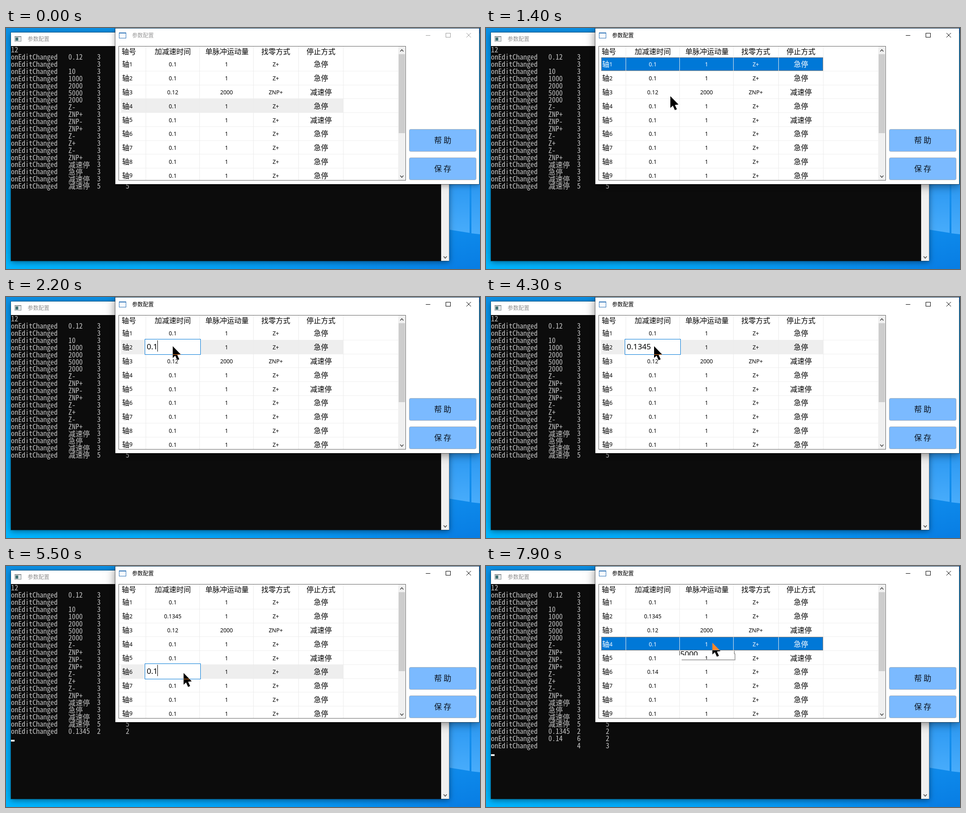
Recreate the animation shown at these times as an HTML page with a canvas. Size 1049 px wide and 534 px high, loop 8000 ms.

```html
<!DOCTYPE html>
<html lang="zh">
<head>
<meta charset="utf-8">
<title>参数配置</title>
<style>
html, body { margin: 0; width: 100%; height: 100%; overflow: hidden; background: #0a93e6; }
canvas { display: block; width: 1049px; height: 534px; }
</style>
</head>
<body>
<canvas id="stage" width="1049" height="534"></canvas>
<script>
const g = document.getElementById('stage').getContext('2d');
const LOOP = 8000, STEP = 100;
const UI = '"Noto Sans", "Open Sans", sans-serif';
const CJK = '"Noto Sans CJK SC", "Noto Sans CJK", "Noto Sans CJK JP", sans-serif';
const MONO = '"Noto Sans Mono CJK SC", "Noto Sans Mono CJK JP", "Liberation Mono", monospace';
const BLUE = '#0078d7';

// Console cell width, and the font size that gives it
const CELL = 7.94;
g.font = `100px ${MONO}`;
const monoSize = CELL * 100 / g.measureText('0').width;

const columns = [309, 428, 547, 647, 746];
const centers = [369, 488, 597, 697];
const headers = ['加减速时间', '单脉冲运动量', '找零方式', '停止方式'];
const ROW = 30.78;

const log = [
  ['12'], ['0.12', 3], ['', 3], ['10', 3], ['1000', 3], ['2000', 3], ['5000', 3], ['2000', 3],
  ['Z-', 3], ['ZNP+', 3], ['ZNP-', 3], ['ZNP+', 3], ['Z-', 3], ['Z+', 3], ['Z-', 3], ['ZNP+', 3],
  ['减速停', 3], ['急停', 3], ['减速停', 3], ['减速停', 5, 5],
  ['0.1345', 2, 2], ['0.14', 6, 2], ['', 4, 3]
];

// time, x, y of the pointer tip
const path = [
  [200, 973, 113], [400, 480, 76], [700, 316, 60], [800, 316, 60], [1000, 336, 78],
  [1400, 408, 151], [1700, 380, 131], [2000, 369, 109], [4200, 369, 109], [4300, 372, 109],
  [5100, 393, 237], [5700, 393, 237], [6000, 391, 251], [6300, 391, 231],
  [6900, 391, 231], [7500, 501, 170]
];

function rect(x, y, w, h, color) {
  g.fillStyle = color;
  g.fillRect(x, y, w, h);
}

function frame(x, y, w, h, color) {
  g.strokeStyle = color;
  g.lineWidth = 1;
  g.strokeRect(x + .5, y + .5, w - 1, h - 1);
}

function line(points, color, width = 1) {
  g.strokeStyle = color;
  g.lineWidth = width;
  g.beginPath();
  points.forEach(([x, y]) => g.lineTo(x, y));
  g.stroke();
}

function shape(points, color) {
  g.fillStyle = color;
  g.beginPath();
  points.forEach(([x, y]) => g.lineTo(x, y));
  g.fill();
}

const isHan = s => /[\u4e00-\u9fff]/.test(s);

// Text centred vertically on cy
function text(s, x, cy, size, color, align = 'left', family = UI) {
  const han = isHan(s);
  g.font = `${size}px ${han ? CJK : family}`;
  g.fillStyle = color;
  g.textAlign = align;
  g.fillText(s, x, cy + size * (han ? .38 : .36));
}

function gradient(x0, y0, x1, y1, ...stops) {
  const fill = g.createLinearGradient(x0, y0, x1, y1);
  stops.forEach((c, i) => fill.addColorStop(i / (stops.length - 1), c));
  return fill;
}

function shadowed(x, y, w, h, color, blur, alpha) {
  g.save();
  g.shadowColor = `rgba(0,0,0,${alpha})`;
  g.shadowBlur = blur;
  g.shadowOffsetY = 3;
  rect(x, y, w, h, color);
  g.restore();
}

function chevron(x, y, dir) {
  line([[x - 3.5, y + 2 * dir], [x, y - 2 * dir], [x + 3.5, y + 2 * dir]], '#505050', 1.8);
}

function desktop() {
  rect(0, 0, 1049, 534, gradient(0, 0, 0, 534, '#0a8fe4', '#04a4f4', '#00b2fc'));
  rect(0, 500, 1049, 34, gradient(0, 0, 1049, 0, '#00b4fd', '#02a8f8', '#0694f0', '#077ee6'));
  rect(240, 0, 809, 12, gradient(240, 0, 1049, 0, '#0a86dc', '#0a6cc8'));
  rect(980, 340, 69, 194, gradient(980, 340, 1010, 534, '#1a90ee', '#0f8cec', '#087ee4'));
  const pane = gradient(0, 346, 0, 455, '#2b98f2', '#48acfb');
  shape([[982, 346], [1026, 346], [1026, 454], [982, 447]], pane);
  shape([[1030, 346], [1049, 346], [1049, 457], [1030, 455]], pane);
}

function consoleWindow(t) {
  shadowed(11, 10, 970, 506, '#fff', 12, .45);
  rect(11, 40, 952, 476, '#0c0c0c');
  rect(963, 40, 17, 476, '#f0f0f0');
  frame(10, 9, 971, 508, 'rgba(0,0,0,.35)');
  chevron(972, 508, -1);
  rect(19, 18, 15, 12, '#8c9296');
  rect(20, 20, 13, 9, '#e4e8ea');
  rect(21, 21, 6, 7, '#3f6f70');
  text('参数配置', 48, 24, 12, '#8f8f8f');

  const count = 20 + (t >= 4500) + (t >= 7000) + (t >= 7900);
  const lineY = i => 48.5 + 15.89 * i;
  const put = (value, col, y) => {
    const s = String(value);
    text(s, 11 + CELL * col, y, isHan(s) ? 2 * CELL : monoSize, '#c6c6c6', 'left', MONO);
  };
  log.slice(0, count).forEach(([value, row, col], i) => {
    const y = lineY(i);
    if (row === undefined) return put(value, 0, y);
    put('onEditChanged', 0, y);
    put(value, 16, y);
    put(row, 24, y);
    if (col) put(col, 32, y);
  });
  if (count > 20) rect(11, Math.round(lineY(count) + 3), 8, 4, '#f2f2f2');
}

function button(y, label) {
  g.beginPath();
  g.roundRect(892.5, y + .5, 148, 49, 3);
  g.fillStyle = '#7bbaff';
  g.fill();
  g.strokeStyle = '#a3adb8';
  g.lineWidth = 1;
  g.stroke();
  text(label, 966.5, y + 25, 17, '#0c1420', 'center');
}

function chrome(active) {
  const ink = active ? '#000' : '#999';
  shadowed(242, 1, 805, 345, '#fff', active ? 20 : 12, active ? .5 : .35);
  frame(241, 0, 807, 347, 'rgba(0,0,0,.5)');
  rect(250, 10, 16, 13, '#2f74b8');
  rect(251, 12, 14, 10, '#f8fbff');
  text('参数配置', 279, 16, 12, ink);
  line([[929, 16.5], [939, 16.5]], ink);
  frame(973, 11, 11, 10, ink);
  line([[1019, 11], [1029, 21]], ink);
  line([[1029, 11], [1019, 21]], ink);
  button(224, '帮 助');
  button(287, '保 存');
}

function cells(row, t) {
  let time = '0.1';
  if (row === 3) time = '0.12';
  if (row === 2 && t >= 4500) time = '0.1345';
  if (row === 6 && t >= 7000) time = '0.14';
  return [time, row === 3 ? '2000' : '1', row === 3 ? 'ZNP+' : 'Z+',
    row === 3 || row === 5 ? '减速停' : '急停'];
}

function selection(t) {
  if (t < 1000) return [4, false];
  if (t < 1700) return [1, true];
  if (t < 5100) return [2, t < 2200];
  if (t < 7800) return [6, t < 5500];
  return [4, true];
}

function table(t) {
  const [selected, focused] = selection(t);
  const top = row => Math.round(65 + ROW * (row - 1));
  const y0 = top(selected);

  g.save();
  g.beginPath();
  g.rect(250, 41, 634, 296);
  g.clip();
  for (let row = 2; row <= 9; row++) rect(250, top(row) - 1, 618, 1, '#efefef');
  rect(255, y0, 491, 30, focused ? BLUE : '#eeeeee');
  columns.forEach(x => rect(x, 41, 1, 297, '#ebebeb'));
  if (focused) {
    g.setLineDash([1, 1]);
    frame(255, y0, 491, 30, '#ff8728');
    g.setLineDash([]);
  }

  text('轴号', 256, 52, 16, '#000');
  headers.forEach((s, i) => text(s, centers[i] + (i === 1), 52, 16, '#000', 'center'));
  for (let row = 1; row <= 9; row++) {
    const cy = 80.3 + ROW * (row - 1);
    const ink = focused && row === selected ? '#fff' : '#000';
    text('轴', 257, cy, 16, ink);
    text(String(row), 273, cy + .5, 12.3, ink);
    cells(row, t).forEach((s, i) => text(s, centers[i], i === 3 ? cy : cy + .7, i === 3 ? 16 : 12.3, ink, 'center'));
  }
  g.restore();

  rect(868, 41, 16, 296, '#f0f0f0');
  rect(869, 58, 14, 175, '#cdcdcd');
  chevron(876, 50, 1);
  chevron(876, 329, -1);
  frame(249, 40, 636, 298, '#646464');
}

function editor(y, value, caret) {
  rect(307, y, 124, 35, '#fff');
  frame(307, y, 124, 35, BLUE);
  text(value, 311.5, y + 17, 17.1, '#000');
  if (caret) rect(Math.round(311.5 + g.measureText(value).width - .5), y + 3, 1, 25, '#000');
}

function editors(t) {
  if (t >= 2200 && t < 4500) {
    const typed = Math.max(0, Math.min(3, (t - 3300) / 100));
    const caret = t < 2700 || (t >= 3200 && t < 4000);
    editor(93, '0.1' + '345'.slice(0, typed), caret);
  }
  if (t >= 5500 && t < 7000) {
    editor(216, t < 6800 ? '0.1' : '0.14', t < 6000 || t >= 6500);
  }
}

// List just beginning to unroll under the cell
function dropdown() {
  rect(428, 188, 122, 10, '#fff');
  rect(433, 207, 119, 2, '#a9a9a9');
  rect(550, 194, 2, 15, '#a9a9a9');
  rect(428, 188, 1, 10, '#333');
  rect(549, 188, 1, 7, '#555');
  g.save();
  g.beginPath();
  g.rect(428, 188, 122, 10);
  g.clip();
  text('5000', 430, 195, 17.1, '#000');
  g.restore();
}

function pointer(t) {
  if (t < path[0][0]) return;
  const i = path.findIndex(p => p[0] > t);
  const b = path[i < 0 ? path.length - 1 : i];
  const a = i < 0 ? b : path[i - 1];
  const k = a === b ? 0 : (t - a[0]) / (b[0] - a[0]);
  g.save();
  g.translate(Math.round(a[1] + (b[1] - a[1]) * k), Math.round(a[2] + (b[2] - a[2]) * k));
  g.globalCompositeOperation = 'difference'; // inverts whatever lies below
  shape([[0, 0], [0, 26], [5.5, 21], [10, 31], [14.5, 29], [10, 19.5], [18, 18.5]], '#fff');
  g.restore();
}

function draw(now) {
  const t = Math.floor(now % LOOP / STEP) * STEP;
  desktop();
  consoleWindow(t);
  chrome(t >= 1000);
  table(t);
  editors(t);
  if (t >= 7900) dropdown();
  pointer(t);
  requestAnimationFrame(draw);
}

requestAnimationFrame(draw);
</script>
</body>
</html>
```
